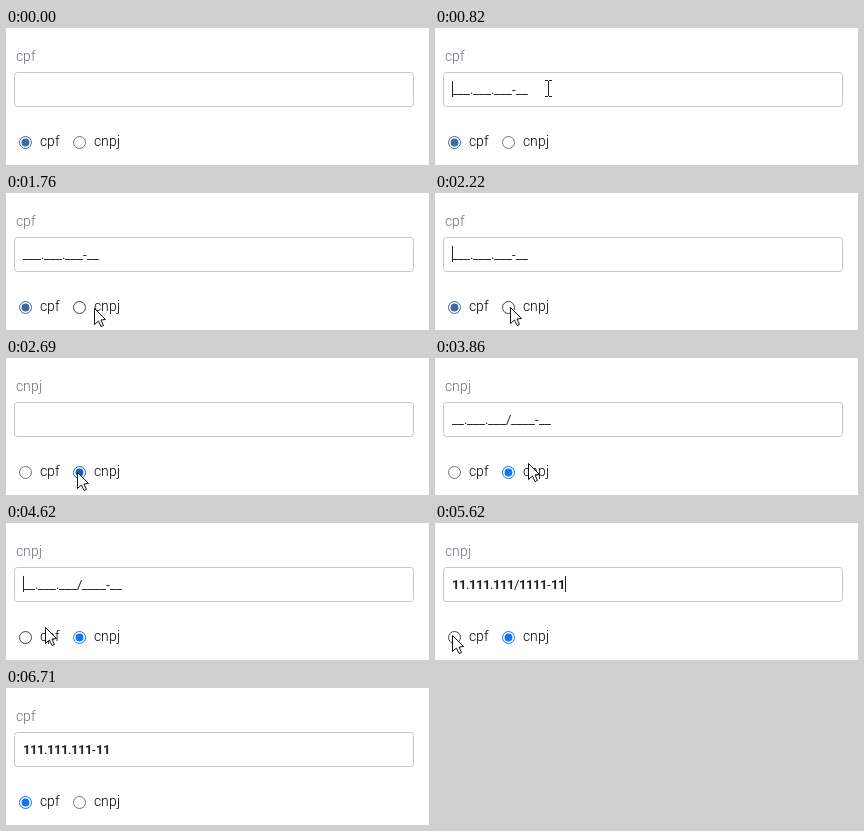
Write an HTML page with a canvas that moves like this. It is 423x137 px and loops after 7800 ms.

```html
<!DOCTYPE html>
<html lang="pt">
<head>
<meta charset="utf-8">
<title>cpf / cnpj</title>
<style>
html, body { margin: 0; width: 100%; height: 100%; overflow: hidden; background: #fff; }
canvas { display: block; }
</style>
</head>
<body>
<canvas id="stage" width="423" height="137"></canvas>
<script>
const ctx = document.getElementById('stage').getContext('2d');
const LOOP = 7800, BLINK = 530, PRESS = 300;
const CPF = '___.___.___-__', CNPJ = '__.___.___/____-__';
const TO_CNPJ = 2540, TO_CPF = 6020;      // radio clicks
const FOCUS_CPF = 820, FOCUS_CNPJ = 3220; // field clicks
const FIRST_KEY = 4650, REPEAT = 5130, KEY_STEP = 34;

// Pointer stops; it rests at each one until the next move begins.
const ENTER = { x: 306, y: 130 };
const MOVES = [
  { start: 280, end: 600, x: 113, y: 52 },
  { start: 740, end: 820, x: 113, y: 60 },
  { start: 980, end: 1450, x: 78, y: 113 },
  { start: 1600, end: 1760, x: 88, y: 115 },
  { start: 1900, end: 2370, x: 71, y: 114 },
  { start: 2760, end: 3300, x: 100, y: 58 },
  { start: 3540, end: 3860, x: 93, y: 105 },
  { start: 3860, end: 4620, x: 39, y: 104 },
  { start: 4620, end: 5160, x: 17, y: 112 },
  { start: 6240, end: 6700, x: 99, y: 93 }
];

const ease = k => k * k * (3 - 2 * k);

function pointerAt(t) {
  if (t < MOVES[0].start || t >= MOVES.at(-1).end) return null;
  const i = MOVES.findLastIndex(m => m.start <= t);
  const from = MOVES[i - 1] || ENTER, to = MOVES[i];
  const k = ease(Math.min(1, (t - to.start) / (to.end - to.start)));
  return { x: from.x + (to.x - from.x) * k, y: from.y + (to.y - from.y) * k };
}

function setFont(size, weight) {
  ctx.font = `${weight} ${size}px Roboto, Arial, sans-serif`;
}

// Text on whole-pixel advances with bold digits; returns the x after each character.
function write(text, x, y, size, color, weight = 300) {
  const stops = [x];
  ctx.fillStyle = color;
  for (const ch of text) {
    setFont(size, weight);
    const advance = Math.round(ctx.measureText(ch).width);
    if (/\d/.test(ch)) setFont(size, 700);
    ctx.fillText(ch, x, y);
    stops.push(x += advance);
  }
  return stops;
}

function circle(x, r) {
  ctx.beginPath();
  ctx.arc(x, 114.5, r, 0, 7);
}

function radio(x, checked, hover, blue) {
  ctx.lineWidth = 1;
  ctx.strokeStyle = checked ? blue : hover ? '#444' : '#6e7480';
  circle(x, 6);
  ctx.stroke();
  if (!checked) return;
  ctx.fillStyle = blue;
  circle(x, 3.9);
  ctx.fill();
}

function keysAt(t) {
  if (t < FIRST_KEY) return 0;
  const repeats = Math.floor((t - REPEAT) / KEY_STEP) + 1;
  return 1 + Math.max(0, Math.min(13, repeats));
}

function lastKeyTime(keys) {
  if (!keys) return FOCUS_CNPJ;
  return keys === 1 ? FIRST_KEY : REPEAT + (keys - 2) * KEY_STEP;
}

// Fills the mask from the left; filled is where the caret stands.
function fill(mask, keys) {
  let left = keys, filled = 0;
  const text = [...mask].map((ch, i) => {
    if (ch !== '_' || !left) return ch;
    left--;
    filled = i + 1;
    return '1';
  }).join('');
  return { text, filled };
}

function field(t) {
  if (t >= TO_CPF) return fill(CPF, 11);
  if (t >= FOCUS_CNPJ) {
    const keys = keysAt(t);
    return { ...fill(CNPJ, keys), since: lastKeyTime(keys) };
  }
  if (t >= FOCUS_CPF && t < TO_CNPJ) return { ...fill(CPF, 0), since: FOCUS_CPF };
  return null;
}

const ARROW = new Path2D('M0 0V16L4 12.5L6.5 18L9 17L6.5 11.5L11 11Z');

function arrow(x, y) {
  ctx.save();
  ctx.translate(Math.round(x) + .5, Math.round(y) + .5);
  ctx.fillStyle = '#fff';
  ctx.fill(ARROW);
  ctx.strokeStyle = '#111';
  ctx.lineWidth = 1;
  ctx.stroke(ARROW);
  ctx.restore();
}

function beam(x, y) {
  x = Math.round(x);
  y = Math.round(y);
  ctx.fillStyle = '#222';
  ctx.fillRect(x, y - 7, 1, 15);
  for (const end of [y - 8, y + 8]) {
    ctx.fillRect(x - 3, end, 3, 1);
    ctx.fillRect(x + 1, end, 3, 1);
  }
}

function draw() {
  const t = performance.now() % LOOP;
  const cnpj = t >= TO_CNPJ && t < TO_CPF;
  const pressed = [TO_CNPJ, TO_CPF].some(click => t >= click && t < click + PRESS);
  const blue = t < TO_CNPJ ? '#4068a6' : pressed ? '#155fbd' : '#0f75f5';
  const p = pointerAt(t);
  const over = (a, b) => !!p && p.y >= 104 && p.y < 124 && p.x >= a && p.x <= b;

  ctx.fillStyle = '#fff';
  ctx.fillRect(0, 0, 423, 137);
  write(cnpj ? 'cnpj' : 'cpf', 10, 33, 14, '#6c737e');

  ctx.strokeStyle = '#c6c6c6';
  ctx.lineWidth = 1;
  ctx.beginPath();
  ctx.roundRect(8.5, 44.5, 399, 34, 3);
  ctx.stroke();

  const value = field(t);
  if (value) {
    const stops = write(value.text, 17, 66, 13, '#222', 400);
    if (value.since && Math.floor((t - value.since) / BLINK) % 2 === 0) {
      ctx.fillStyle = '#222';
      ctx.fillRect(stops[value.filled], 53, 1, 16);
    }
  }

  radio(19.5, !cnpj, over(13, 56), blue);
  radio(73.5, cnpj, over(67, 116), blue);
  write('cpf', 34, 118, 14, '#000');
  write('cnpj', 88, 118, 14, '#000');

  if (p) {
    const inField = p.x > 8 && p.x < 408 && p.y > 44 && p.y < 79;
    (inField ? beam : arrow)(p.x, p.y);
  }
  requestAnimationFrame(draw);
}
draw();
</script>
</body>
</html>
```
